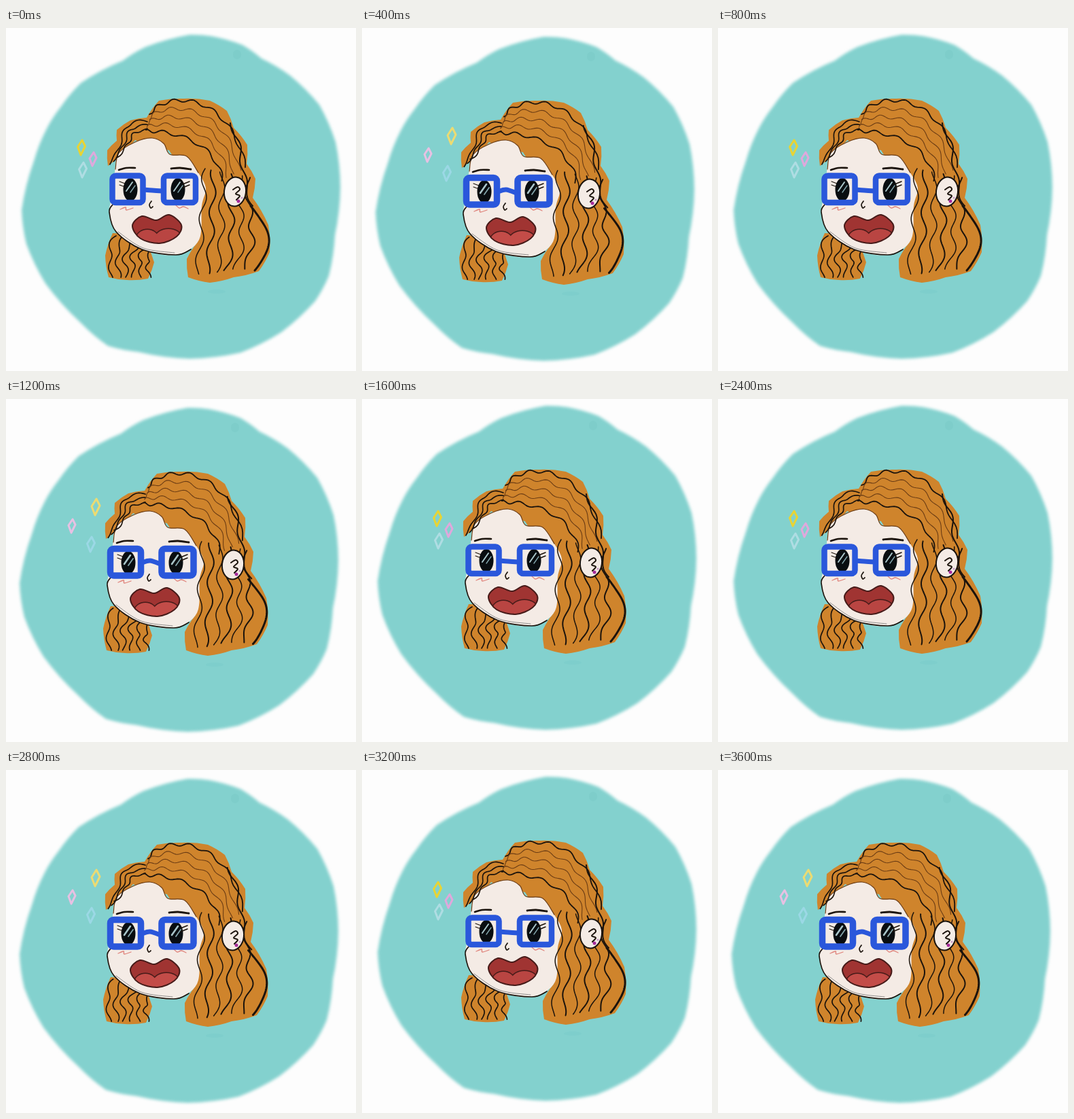
These frames come from a looping animation (515 by 505 pixels, 4000 ms). An HTML page with a canvas:

```html
<!DOCTYPE html>
<html lang="en">
<head>
<meta charset="utf-8">
<title>Curly portrait</title>
<style>
html, body { margin: 0; width: 100%; height: 100%; overflow: hidden; background: #fdfdfd; }
canvas { display: block; }
</style>
</head>
<body>
<canvas id="stage" width="515" height="505"></canvas>
<script>
const ctx = document.getElementById('stage').getContext('2d');
const HAIR = '#cf842c', SKIN = '#f4ebe5', INK = '#1b130c', BROWN = '#6b3c14';
const BLUE = '#2a57db', TEAL = '#83d1ce', LIP = '#461b19';
const HOLD = 400;
let phase = 0; // shifts the curls between the two poses

const points = text => text.split(' ').map(p => p.split(',').map(Number));
const mix = (a, b, k) => a + (b - a) * k;
const blend = (a, b, k) => a.map((p, i) => p.map((v, j) => mix(v, b[i][j], k)));

function paint(fill, width, edge = INK) {
  if (fill) {
    ctx.fillStyle = fill;
    ctx.fill();
  }
  if (width) {
    ctx.lineWidth = width;
    ctx.strokeStyle = edge;
    ctx.stroke();
  }
}

// Smooth curve through a few points.
function curve(text, closed) {
  const p = points(text), n = p.length;
  const at = i => closed ? p[(i + n) % n] : p[Math.max(0, Math.min(n - 1, i))];
  ctx.beginPath();
  ctx.moveTo(...p[0]);
  for (let i = 0; i < (closed ? n : n - 1); i++) {
    const [a, b, c, d] = [at(i - 1), at(i), at(i + 1), at(i + 2)];
    ctx.bezierCurveTo(
      b[0] + (c[0] - a[0]) / 6, b[1] + (c[1] - a[1]) / 6,
      c[0] - (d[0] - b[0]) / 6, c[1] - (d[1] - b[1]) / 6, c[0], c[1]);
  }
  if (closed) ctx.closePath();
}

function line(text, width, color) {
  curve(text, false);
  paint(null, width, color);
}

// Clockwise corners joined by lobes that swell outward.
function cloud(text, swell) {
  const p = points(text);
  ctx.beginPath();
  ctx.moveTo(...p[0]);
  p.forEach(([x, y], i) => {
    const [u, v] = p[(i + 1) % p.length];
    ctx.quadraticCurveTo((x + u) / 2 + (v - y) * swell, (y + v) / 2 - (u - x) * swell, u, v);
  });
}

// Wavy lock along a cubic curve.
function strand([a, b, c, d], size, waves, width, color, shift = 0) {
  const at = (t, k) => (1 - t) ** 3 * a[k] + 3 * t * (1 - t) ** 2 * b[k]
    + 3 * t * t * (1 - t) * c[k] + t ** 3 * d[k];
  ctx.beginPath();
  for (let i = 0; i <= 60; i++) {
    const t = i / 60;
    const dx = at(t + 0.01, 0) - at(t - 0.01, 0), dy = at(t + 0.01, 1) - at(t - 0.01, 1);
    const off = size * Math.sin(waves * 2 * Math.PI * t + shift + phase) / Math.hypot(dx, dy);
    ctx.lineTo(at(t, 0) - dy * off, at(t, 1) + dx * off);
  }
  paint(null, width, color);
}

function oval(x, y, rx, ry, fill, turn = 0, width = 0, edge = INK) {
  ctx.beginPath();
  ctx.ellipse(x, y, rx, ry, turn, 0, 7);
  paint(fill, width, edge);
}

function drawDisc() {
  ctx.filter = 'blur(2px)';
  cloud('270,10 302,12 348,25 376,45 418,70 461,113 485,168 492,235 484,305 475,365 455,402 405,448 345,478 270,487 195,477 150,468 110,434 58,376 30,318 23,268 41,196 60,148 80,117 110,81 172,48 205,28', 0.05);
  paint(TEAL);
  ctx.filter = 'none';
  oval(340, 39, 6, 7, 'rgba(110,195,192,.25)');
  oval(310, 388, 13, 3, 'rgba(110,200,200,.25)');
}

function drawTail() {
  cloud('157,302 175,304 208,320 218,345 209,369 178,371 151,367 146,335', 0.06);
  paint(HAIR);
  for (let i = 0; i < 6; i++) {
    const x = 153 + i * 11, top = 306 + i * 4;
    strand(points(`${x + 9},${top} ${x - 8},${top + 22} ${x + 3},345 ${x + 2},367`), 3.5, 1.6, 1.7, INK, i * 1.4);
  }
}

function drawHair() {
  const outer = points('211,127 235,92 330,92 352,205');
  const inner = points('206,152 225,150 310,158 318,225');
  for (let i = 0; i < 5; i++) {
    const edge = i === 0 || i === 4;
    strand(blend(outer, inner, i / 4), 2.5, 6 - i * 0.4, edge ? 1.8 : 1.1, edge ? INK : BROWN, i);
  }
  for (let i = 0; i < 3; i++) {
    strand(points(`208,${138 + i * 6} ${160 + i * 8},${132 + i * 9} ${180 + i * 5},170 ${152 + i * 5},${200 - i * 5}`), 2, 2.6, 1.7, INK, i);
  }
  const left = points('293,207 290,255 288,310 281,362');
  const right = points('356,220 353,280 374,300 352,355');
  for (let i = 0; i < 6; i++) {
    strand(blend(left, right, i / 5), 4.5, 2.6, i % 2 ? 2 : 1.5, INK, i * 1.1);
  }
  strand(points('330,140 350,175 345,220 363,262'), 3, 2.5, 2, INK);
  strand(points('360,262 390,290 396,330 366,357'), 1.5, 1.5, 3, INK);
}

function drawHead() {
  drawTail();
  cloud('150,203 149,180 163,166 163,150 183,136 207,132 225,107 262,104 300,107 325,122 335,147 355,172 354,200 367,222 363,250 386,290 388,330 372,358 335,367 300,375 268,367 266,340 282,315 285,240 240,180 190,165', 0.06);
  paint(HAIR);
  curve('160,212 166,184 190,168 215,162 232,170 241,186 266,189 283,213 294,236 288,262 284,312 250,334 200,326 162,300 152,271 158,240', true);
  paint(SKIN);
  line('161,208 166,184 190,168 215,162 232,170 241,186 266,189 283,213', 1.2, BROWN);
  line('157,260 152,271 162,300 200,326 250,334 272,326', 1.7, INK);
  line('165,300 202,324 248,331', 0.8, '#767676');
  drawHair();
  oval(337, 241, 16, 21.5, SKIN, 0.12, 2);
  line('334,238 341,234 344,238 338,244 344,247 339,253', 2, INK);
  oval(342, 255, 2.5, 2.5, '#a72b9b');
  oval(347, 250, 1.5, 1.5, '#c69ac5');
}

function drawEye(x, alt) {
  const glint = alt ? 2.6 : 2;
  oval(x, 238, 10.5, 17, '#090d10');
  line(`${x - 6},240 ${x + 3},227`, glint, '#a9c5c9');
  line(`${x},242 ${x + 7},232`, glint * 0.7, '#83a5ab');
}

function drawFeatures(alt) {
  line('166,209 177,206 190,206', 2.6, INK);
  line('243,207 256,206 272,208', 2.8, INK);
  drawEye(183, alt);
  drawEye(253, alt);
  for (const y of [226, 231]) {
    line(`260,${y + 4} 270,${y}`, 1.5, INK);
    line(`175,${y + 3} 167,${y}`, 1.2, INK);
  }
  line('214,255 211,260 213,265 216,263', 1.7, INK);
  line('168,267 176,264 177,268 187,265', 1.3, '#df8179');
  line('250,261 255,265 261,263 268,266', 1.3, '#df8179');
}

function drawMouth(alt) {
  const lips = '186,291 200,277 221,283 240,275 258,290 251,307 226,317 198,310';
  const tongue = [[208, 310, 16], [239, 309, 19]];
  curve(lips, true);
  paint('#a03432');
  ctx.save();
  ctx.clip();
  tongue.forEach(([x, y, r]) => oval(x, y, r, 13, null, 0, 3, LIP));
  tongue.forEach(([x, y, r]) => oval(x, y, r, 13, alt ? '#c34c48' : '#b94542'));
  ctx.restore();
  curve(lips, true);
  paint(null, 2, LIP);
}

function drawGlasses(alt) {
  for (const [x, w] of [[156.5, 45], [232, 47]]) {
    ctx.beginPath();
    ctx.roundRect(x, 217.5, w, 39.5, 5);
    paint(null, alt ? 9.5 : 8.5, BLUE);
  }
  const lift = alt ? 235 : 239;
  line(`203,238 215,${lift} 230,240`, 7, BLUE);
}

function sparkle(x, y, h, color) {
  const w = h * 0.5;
  ctx.beginPath();
  ctx.moveTo(x + 1, y - h);
  ctx.lineTo(x + w, y - 2);
  ctx.lineTo(x - 1, y + h);
  ctx.lineTo(x - w, y - 1);
  ctx.closePath();
  paint(null, 3, color);
}

function drawSparkles(alt) {
  if (alt) {
    sparkle(132, 159, 12, '#ecdb72');
    sparkle(97, 187, 10, '#e7c1e3');
    sparkle(125, 214, 11, '#9bd8e5');
  } else {
    sparkle(111, 176, 11, '#e8d434');
    sparkle(128, 193, 10, '#dfa8dc');
    sparkle(113, 209, 11, '#afdde3');
  }
}

function draw(alt) {
  ctx.fillStyle = '#fdfdfd';
  ctx.fillRect(0, 0, 515, 505);
  ctx.lineCap = ctx.lineJoin = 'round';
  phase = alt ? 0.5 : 0;
  ctx.save();
  if (alt) ctx.translate(-3, 3);
  drawDisc();
  drawHead();
  drawFeatures(alt);
  drawMouth(alt);
  drawGlasses(alt);
  ctx.restore();
  drawSparkles(alt);
}

let shown = -1;
const start = performance.now();
function tick() {
  const pose = Math.floor((performance.now() - start) / HOLD) % 2;
  if (pose !== shown) draw(pose === 1);
  shown = pose;
  requestAnimationFrame(tick);
}
tick();
</script>
</body>
</html>
```
